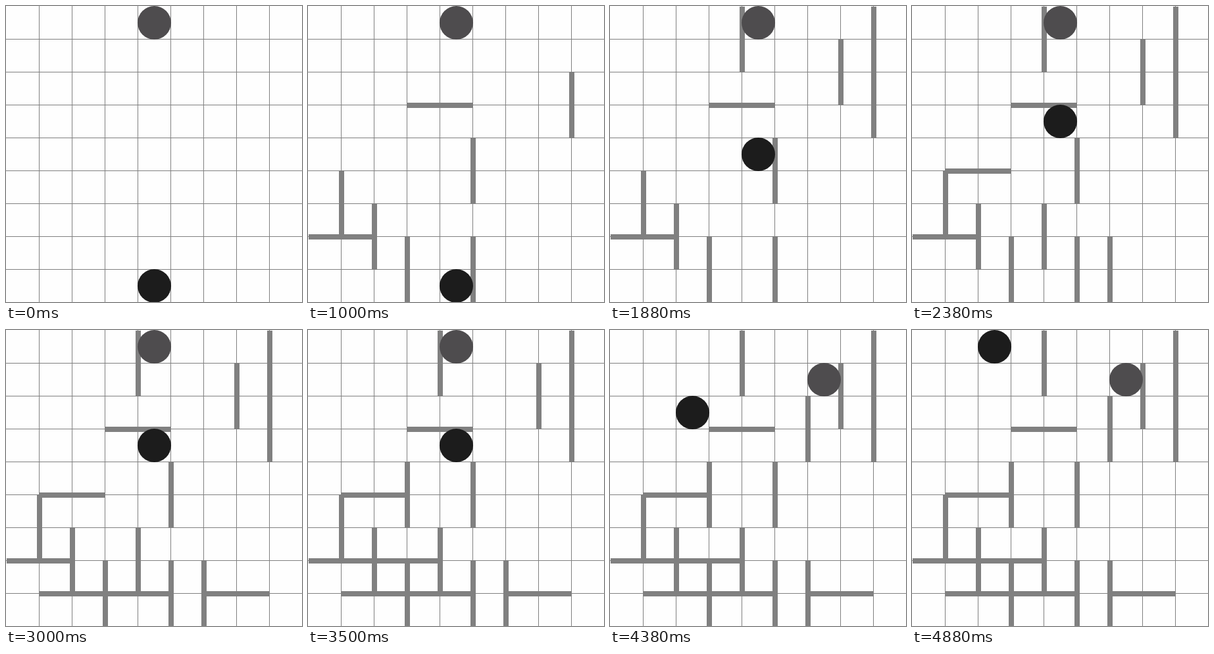
Animation of 450 by 450 pixels, one loop 5.01 s. Source, as an HTML page:

```html
<!DOCTYPE html>
<html lang="en">
<head>
<meta charset="utf-8">
<title>Wall board game</title>
<style>
html, body { margin: 0; width: 100%; height: 100%; overflow: hidden; background: #fefefe; }
svg { display: block; width: 100vw; height: 100vh; }
</style>
</head>
<body>
<svg id="board" viewBox="0 0 450 450"></svg>
<script>
const CELL = 50, LOOP = 5010, GREY = '#808080';
const board = document.getElementById('board');

// One turn per step: h/v + column + row places a wall, b/g + direction moves a pawn.
const turns = ('v82 v57 h33 v37 v15 v26 h07 v54 bu v71 bu v80 bu v40 bu v67 bu h15 v46 h68 ' +
  'h18 gr h38 gl h27 gr v34 gl v62 gr bl gr bl gd bu gu bu gd bu').split(' ');
const directions = { u: [0, -1], d: [0, 1], l: [-1, 0], r: [1, 0] };

function add(tag, attributes) {
  const node = document.createElementNS('http://www.w3.org/2000/svg', tag);
  for (const key in attributes) node.setAttribute(key, attributes[key]);
  return board.appendChild(node);
}

const rect = (x, y, width, height) => add('rect', { x, y, width, height, fill: GREY });
const pawn = fill => add('circle', { r: 25.5, fill });

for (let p = CELL; p < 450; p += CELL) {
  rect(p, 0, 1, 450);
  rect(0, p, 450, 1);
}

const walls = turns.map(([kind, column, row]) => {
  if (kind !== 'h' && kind !== 'v') return null;
  const x = column * CELL, y = row * CELL;
  return kind === 'h' ? rect(x + 1, y - 3, 99, 8) : rect(x - 3, y + 1, 8, 99);
});
const pawns = { g: pawn('#4e4c4e'), b: pawn('#1c1c1c') };

// Turn times are multiples of 125 ms, rounded to 10 ms.
function stepAt(time) {
  const step = Math.floor(time / 125);
  const start = 10 * Math.round(step * 12.5);
  return Math.min(start > time ? step - 1 : step, turns.length);
}

function draw(time) {
  const step = stepAt(time);
  const cells = { g: [4, 0], b: [4, 8] };
  turns.forEach(([kind, direction], i) => {
    if (walls[i]) {
      walls[i].setAttribute('visibility', i < step ? 'visible' : 'hidden');
    } else if (i < step) {
      const [dx, dy] = directions[direction];
      cells[kind][0] += dx;
      cells[kind][1] += dy;
    }
  });
  for (const key in pawns) {
    pawns[key].setAttribute('cx', cells[key][0] * CELL + 25.5);
    pawns[key].setAttribute('cy', cells[key][1] * CELL + 25.5);
  }
}

const begin = performance.now();
function tick() {
  draw((performance.now() - begin) % LOOP);
  requestAnimationFrame(tick);
}
tick();
</script>
</body>
</html>
```
